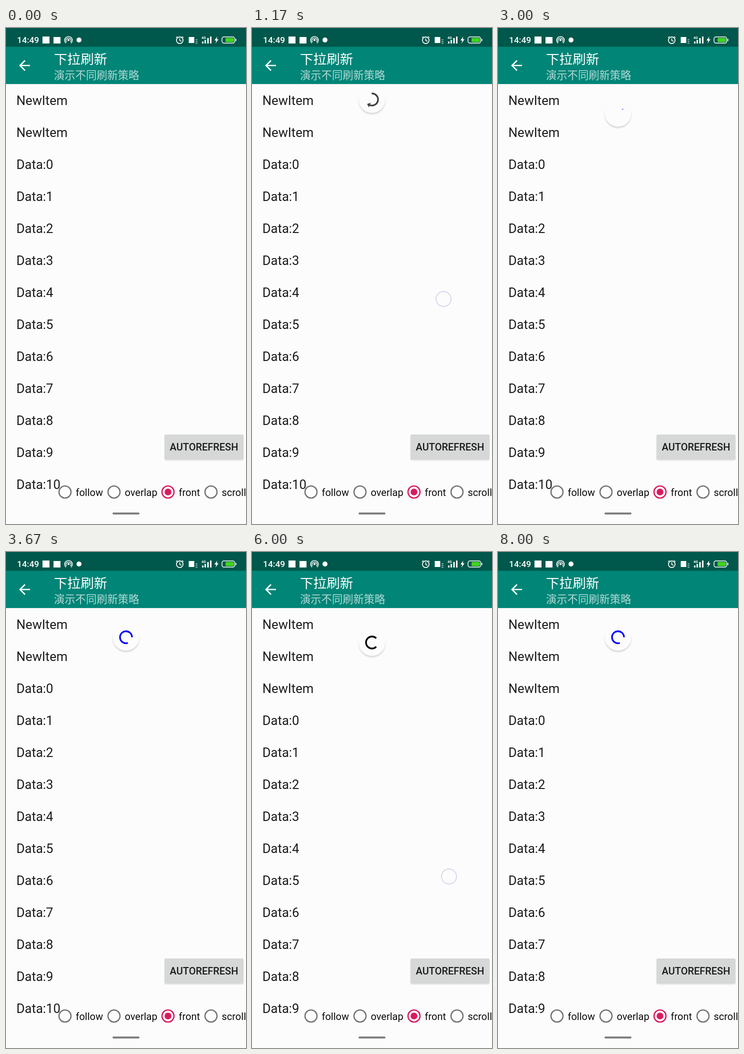
These frames come from a looping animation (480 by 992 pixels, 8170 ms). An HTML page:

```html
<!DOCTYPE html>
<html lang="zh-CN">
<head>
<meta charset="utf-8">
<style>
  html, body { margin: 0; width: 100%; height: 100%; overflow: hidden; background: #fcfcfc; }
  svg { display: block; width: 480px; height: 992px; }
  text { font-family: Roboto, "Noto Sans CJK SC", "Noto Sans CJK", sans-serif; }
  .row { font-size: 25.6px; fill: #1c1c1c; }
  .label { font-size: 20px; fill: #0c0c0c; }
  .line { fill: none; stroke: #fff; }
</style>
</head>
<body>
<svg viewBox="0 0 480 992">
  <defs>
    <clipPath id="body"><rect y="112" width="480" height="880"/></clipPath>
    <filter id="soft" x="-30%" y="-30%" width="160%" height="160%"><feGaussianBlur stdDeviation="1.3"/></filter>
  </defs>
  <rect width="480" height="992" fill="#fcfcfc"/>
  <g id="rows"></g>

  <rect x="317" y="815" width="158" height="50" rx="3" fill="#e0e0e0" filter="url(#soft)"/>
  <rect x="317" y="813" width="158" height="50" rx="3" fill="#d6d7d7"/>
  <text x="396" y="845" font-size="20" font-weight="500" text-anchor="middle" fill="#1c1c1c">AUTOREFRESH</text>
  <g id="radios"></g>
  <rect x="213" y="969" width="54" height="4" rx="2" fill="#808080"/>

  <g clip-path="url(#body)">
    <g id="bubble">
      <circle cy="3.2" r="26.8" fill="#dedede" filter="url(#soft)"/>
      <circle r="26.5" fill="#fcfcfc"/>
      <path id="arc" fill="none" stroke-width="3.3"/>
      <path id="head" d="M7 0H17L12 6Z"/>
    </g>
  </g>
  <circle id="touch" r="15" fill="none" stroke="#d2d7ea" stroke-width="1.8"/>

  <rect y="37" width="480" height="75" fill="#008577"/>
  <rect y="112" width="480" height="1" fill="#e6ebe9"/>
  <rect width="480" height="37.5" fill="#00574b"/>
  <path class="line" d="M48 75H28M38 65L28 75L38 85" stroke-width="2.6"/>
  <text x="96" y="72" font-size="26.6" fill="#fff">下拉刷新</text>
  <text x="96" y="101.5" font-size="21.3" fill="#b2dad6">演示不同刷新策略</text>

  <text x="22" y="30" font-size="17.4" font-weight="500" fill="#fff">14:49</text>
  <g fill="#fff">
    <rect x="73" y="17" width="14" height="14"/>
    <rect x="95" y="18" width="14" height="13"/>
    <circle cx="125" cy="24" r="2.2"/>
    <path class="line" d="M121 28a5 5 0 1 1 8 0M120 30.5a7.7 7.7 0 1 1 10 0" stroke-width="1.6"/>
    <circle cx="146" cy="24" r="5"/>
    <circle class="line" cx="347.5" cy="24.5" r="6.6" stroke-width="1.7"/>
    <path class="line" d="M347.5 20.5V25L351 26.5M340 19.5L343 17M355 19.5L352 17" stroke-width="1.6"/>
    <rect x="365.5" y="18" width="11" height="12"/>
    <path class="line" d="M379 23.5H383M379 27H383M379 30.5H383" stroke-width="1.5" opacity=".65"/>
    <text x="391" y="21.5" font-size="7" font-weight="700">4G</text>
    <path d="M392 27h3v4h-3zM397 24h3v7h-3zM402.5 20h3v11h-3zM408 17h3v14h-3z"/>
    <path d="M422.5 17L417 25H420.5L419 31L425 22.5H421.5Z"/>
    <rect class="line" x="432" y="17.8" width="25.5" height="12.5" rx="4" stroke-width="1.5"/>
    <rect x="459" y="21.5" width="1.6" height="5" rx=".8"/>
    <rect x="439" y="19.8" width="16.8" height="8.5" rx="2" fill="#43d321"/>
  </g>
</svg>
<script>
const $ = id => document.getElementById(id);
const LOOP = 8170, STEPS = 49, CYCLE = 1332, INSERT = 23;

$('rows').innerHTML = Array.from({ length: 13 }, (_, i) =>
  `<text class="row" x="20.8" y="${154 + 64 * i}"></text>`).join('');

$('radios').innerHTML = [['follow', 118], ['overlap', 216], ['front', 324], ['scroll', 410]]
  .map(([name, x]) => {
    const on = name === 'front', color = on ? '#d81b60' : '#757575';
    return `<circle cx="${x}" cy="928" r="12" fill="#fcfcfc" stroke="${color}" stroke-width="2.6"/>` +
      (on ? `<circle cx="${x}" cy="928" r="6.8" fill="${color}"/>` : '') +
      `<text class="label" x="${x + 21.5}" y="935.5">${name}</text>`;
  }).join('');

// Each key: step, bubble y, touch x, touch y, arc start, arc sweep
const pulls = [
  [[4, 84, 383, 490, -190, 60], [5, 100, 383, 503, -160, 110], [7, 143, 383, 542, -93, 204],
   [8, 158, 384, 560, -50, 225], [10, 181, 388, 585, 45, 270]],
  [[27, 84, 383, 568, -190, 60], [28, 112, 383, 588, -140, 140], [29, 139, 384, 611, -97, 206],
   [31, 164, 386, 628, -40, 230], [33, 174, 389, 640, 0, 255], [36, 181, 394, 649, 45, 270]]
];

function sample(keys, k) {
  const i = Math.max(1, keys.findIndex(key => key[0] >= k));
  const a = keys[i - 1], b = keys[i], p = (k - a[0]) / (b[0] - a[0]);
  return a.map((v, n) => v + (b[n] - v) * p);
}

// cubic-bezier(.4, 0, .2, 1)
function ease(x) {
  let lo = 0, hi = 1;
  for (let i = 0; i < 20; i++) {
    const m = (lo + hi) / 2, n = 1 - m;
    if (1.2 * n * n * m + .6 * n * m * m + m ** 3 < x) lo = m; else hi = m;
  }
  return lo * lo * (3 - 2 * lo);
}

function spin(ms) {
  const u = ms / CYCLE, turn = Math.floor(u), t = u - turn;
  const grow = ease(Math.min(1, t * 2)), trim = ease(Math.max(0, t * 2 - 1));
  const blend = turn ? 1 : Math.max(0, (t - .75) * 4);
  return {
    start: 163.7 + 284.4 * (turn + trim) + 229.3 * u,
    sweep: 284.4 * (grow - trim) + 3.6,
    color: `rgb(0,0,${Math.round(250 * blend)})`
  };
}

function place(el, x, y, scale = 1) {
  el.setAttribute('transform', `translate(${x} ${y}) scale(${scale})`);
}

function show(el, on) {
  el.setAttribute('visibility', on ? 'visible' : 'hidden');
}

function drawRing({ start, sweep, color }, arrow) {
  const at = deg => {
    const a = deg * Math.PI / 180;
    return `${12 * Math.cos(a)} ${12 * Math.sin(a)}`;
  };
  const end = start + sweep;
  $('arc').setAttribute('d', `M${at(start)}A12 12 0 ${sweep > 180 ? 1 : 0} 1 ${at(end)}`);
  $('arc').setAttribute('stroke', color);
  $('head').setAttribute('fill', color);
  $('head').setAttribute('transform', `rotate(${end})`);
  $('head').setAttribute('display', arrow ? 'inline' : 'none');
}

function render(k) {
  const added = k < INSERT ? 2 : 3;
  [...$('rows').children].forEach((row, i) => {
    row.textContent = i < added ? 'NewItem' : 'Data:' + (i - added);
  });

  const keys = pulls[k < 25 ? 0 : 1];
  const first = keys[0][0], last = keys[keys.length - 1][0];
  const held = k >= first && k <= last;
  const spinning = k > last && (last > INSERT || k <= INSERT);
  show($('bubble'), held || spinning);
  show($('touch'), held);

  if (held) {
    const [, y, tx, ty, start, sweep] = sample(keys, k);
    const armed = k === last;
    place($('bubble'), 240, y);
    place($('touch'), tx, ty);
    drawRing({ start, sweep, color: armed ? '#000' : '#404040' }, !armed);
  } else if (spinning) {
    const n = k - last;
    place($('bubble'), 240, n === 1 ? 174 : 170.5, k === INSERT ? .5 : 1);
    drawRing(spin(n * 1000 / 6), false);
  }
}

let shown = -1;
function tick(now) {
  const k = Math.min(STEPS - 1, Math.floor((now % LOOP + 8) / (LOOP / STEPS)));
  if (k !== shown) render(shown = k);
  requestAnimationFrame(tick);
}
render(0);
requestAnimationFrame(tick);
</script>
</body>
</html>
```
